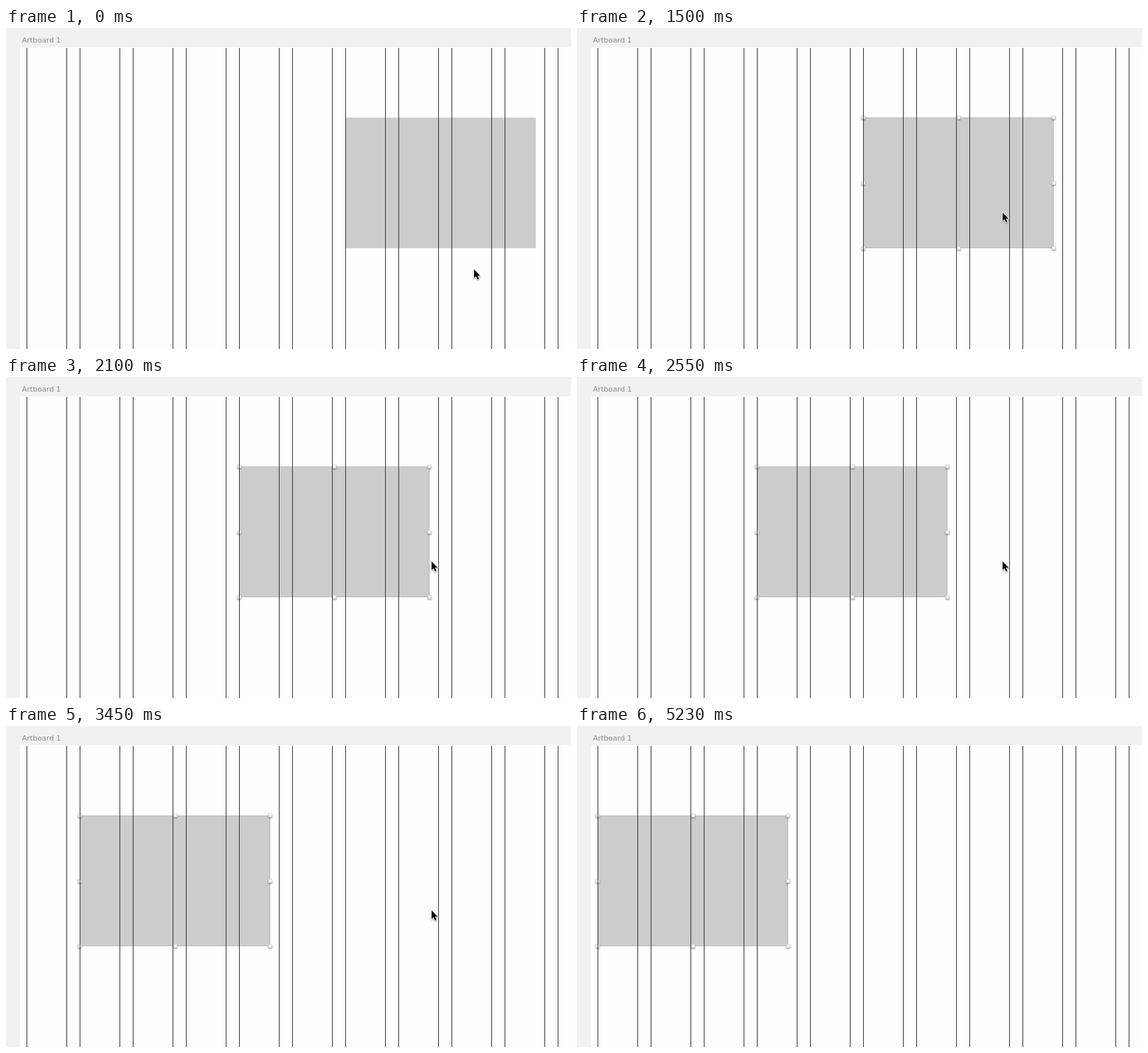
Animation of 851x484 px, one loop 5410 ms. Source, as an HTML page with a canvas:

```html
<!DOCTYPE html>
<html lang="en">
<head>
<meta charset="utf-8">
<title>Artboard</title>
<style>
  html, body { margin: 0; width: 100%; height: 100%; overflow: hidden; background: #f1f1f1; }
  canvas { display: block; width: 851px; height: 484px; }
</style>
</head>
<body>
<canvas id="stage" width="851" height="484"></canvas>
<script>
const ctx = document.getElementById('stage').getContext('2d');
const LOOP = 5410;
const BOX = { y: 135, w: 287, h: 197 };

// Each track is a list of [start time, value]; values hold until the next step.
const cursorTrack = [
  [0, [705, 364]], [150, [702, 362]], [300, [655, 303]], [450, [641, 278]],
  [4790, [719, 355]], [4940, [783, 436]], [5090, [805, 481]], [5230, null]
];
const fillTrack = [
  [0, 511], [1500, 431], [1950, 351], [2550, 271], [3000, 191], [3450, 111], [3890, 31]
];
// The selection frame catches up late on the second nudge.
const frameTrack = fillTrack.map(([t, x]) => [t === 1950 ? 2100 : t, x]);
const modeTrack = [[0, 'none'], [300, 'hover'], [600, 'selected']];

function at(track, t) {
  let value = track[0][1];
  for (const [start, v] of track) if (t >= start) value = v;
  return value;
}

function rect(x, y, w, h, color) {
  ctx.fillStyle = color;
  ctx.fillRect(x, y, w, h);
}

function outline(x, y, w, h, color, width) {
  ctx.strokeStyle = color;
  ctx.lineWidth = width;
  ctx.strokeRect(x, y, w, h);
}

function drawHandle(x, y) {
  ctx.save();
  ctx.shadowColor = 'rgba(0,0,0,0.45)';
  ctx.shadowBlur = 2;
  ctx.shadowOffsetY = 1;
  const shade = ctx.createLinearGradient(0, y - 3, 0, y + 3);
  shade.addColorStop(0, '#ffffff');
  shade.addColorStop(1, '#e4e4e4');
  ctx.fillStyle = shade;
  ctx.beginPath();
  ctx.roundRect(x - 3, y - 3, 6, 6, 1);
  ctx.fill();
  ctx.restore();
  outline(x - 2.5, y - 2.5, 5, 5, 'rgba(120,120,120,0.25)', 1);
}

function drawSelection(x) {
  outline(x + 0.5, BOX.y + 0.5, BOX.w - 1, BOX.h - 1, '#b5b5b5', 1);
  for (let col = 0; col < 3; col++) {
    for (let row = 0; row < 3; row++) {
      if (col === 1 && row === 1) continue;
      drawHandle(Math.round(x + col * BOX.w / 2), Math.round(BOX.y + row * BOX.h / 2));
    }
  }
}

function drawGuides() {
  for (let x = 31; x < 851; x += 80) {
    rect(x, 30, 1, 454, '#2b2b2b');
    rect(x + 60, 30, 1, 454, '#2b2b2b');
  }
}

function drawCursor(x, y) {
  ctx.save();
  ctx.translate(x, y);
  const arrow = new Path2D('M0 0V13L3 10.3L5.2 15.2L7.4 14.2L5.2 9.5H9.2Z');
  ctx.lineJoin = 'round';
  ctx.strokeStyle = '#fff';
  ctx.lineWidth = 2;
  ctx.shadowColor = 'rgba(0,0,0,0.4)';
  ctx.shadowBlur = 2;
  ctx.shadowOffsetY = 1;
  ctx.stroke(arrow);
  ctx.shadowColor = 'transparent';
  ctx.fillStyle = '#000';
  ctx.fill(arrow);
  ctx.restore();
}

function draw(t) {
  rect(0, 0, 851, 484, '#f1f1f1');
  rect(21, 29, 830, 455, '#fefefe');
  ctx.font = '11px "DejaVu Sans", sans-serif';
  ctx.fillStyle = '#8a8a8a';
  ctx.fillText('Artboard 1', 24, 22);

  const mode = at(modeTrack, t);
  const fillX = at(fillTrack, t);
  rect(fillX, BOX.y, BOX.w, BOX.h, '#cccccc');
  if (mode === 'hover') outline(fillX, BOX.y, BOX.w, BOX.h, '#a8a8a8', 2);
  if (mode === 'selected') drawSelection(at(frameTrack, t));
  drawGuides();

  const cursor = at(cursorTrack, t);
  if (cursor) drawCursor(...cursor);
}

const begin = performance.now();
function tick() {
  draw((performance.now() - begin) % LOOP);
  requestAnimationFrame(tick);
}
tick();
</script>
</body>
</html>
```
